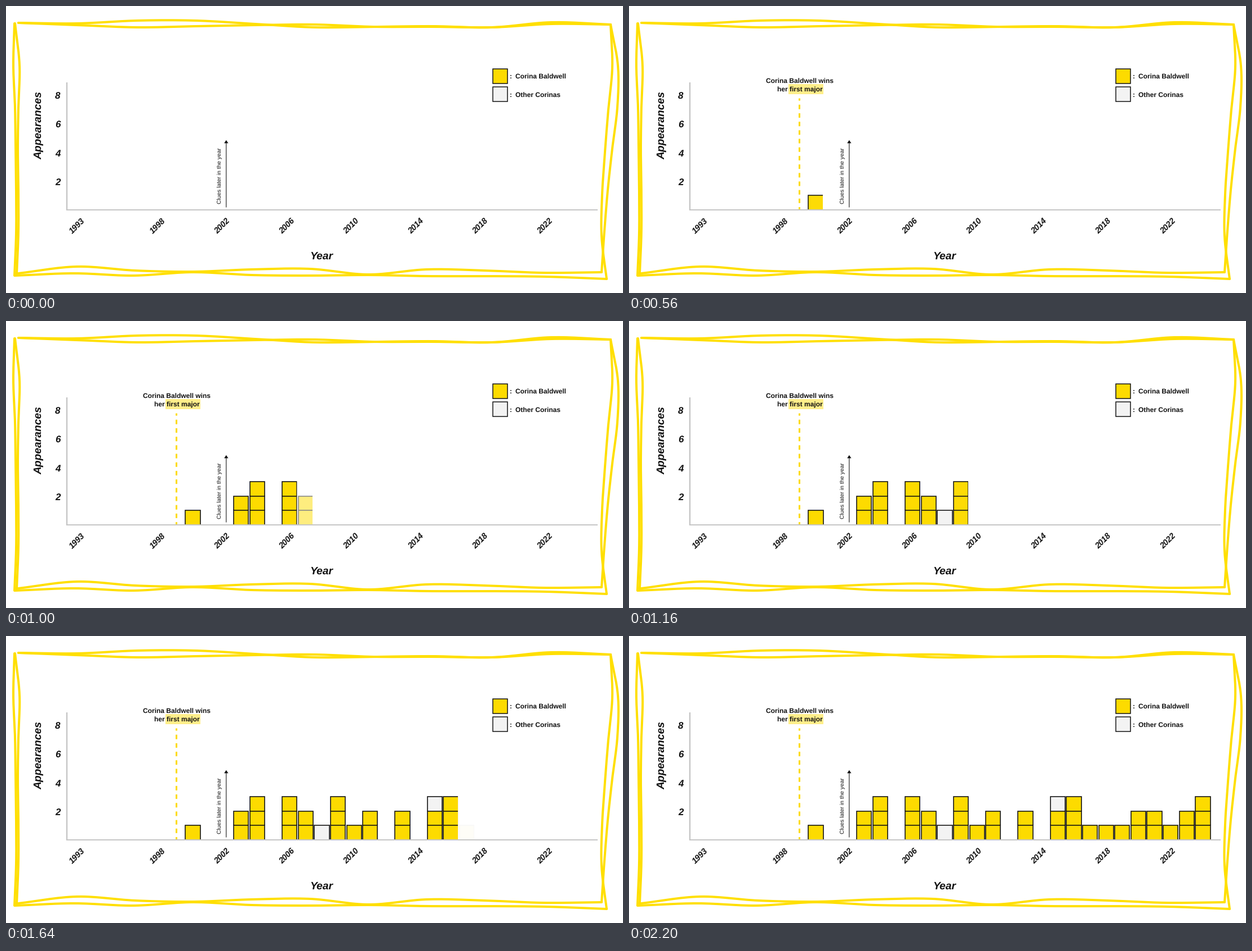
Recreate the animation shown at these times as a matplotlib script. Size 1095 by 511 pixels, loop 2.48 s.

```python
import numpy as np
import matplotlib.pyplot as plt
from matplotlib.animation import FuncAnimation
from matplotlib.patches import Polygon, Rectangle

W, H, DPI = 1095, 511, 100
STEP, FRAMES = 40, 62
PX = 72 / DPI

YELLOW, GREY, INK = "#fddb00", "#f3f3f3", "#111111"
SKETCH, AXIS, MARKER = "#ffdf00", "#c6c6c6", "#ffee8a"

BASE, BLOCK, BAR_W, PITCH = 363.2, 25.7, 26.3, 28.63
YEAR_MS = 200 / 3
FIRST = 2000
COUNTS = "1002303213120203311122123"  # bar heights, one digit per year
LAST = FIRST + len(COUNTS) - 1
GREY_BLOCKS = {(2008, 0), (2015, 2)}

plt.rcParams["font.family"] = "Liberation Sans"
plt.rcParams["text.hinting"] = "none"

fig = plt.figure(figsize=((W + 0.01) / DPI, (H + 0.01) / DPI), dpi=DPI,
                 facecolor="white")
ax = fig.add_axes([0, 0, 1, 1])
ax.set_xlim(0, W)
ax.set_ylim(H, 0)
ax.axis("off")


def line(xs, ys, color, width, z=4, **kw):
    return ax.plot(xs, ys, color=color, lw=width * PX, zorder=z, **kw)[0]


def box(x, y, w, h, color, z=2, **kw):
    return ax.add_patch(Rectangle((x, y), w, h, fc=color, zorder=z, **kw))


def label(x, y, text, size, bold=True, italic=False, ha="center", turn=0):
    return ax.text(x, y, text, fontsize=size * PX, color=INK, ha=ha,
                   va="baseline", rotation=turn, rotation_mode="anchor",
                   weight="bold" if bold else "normal",
                   style="italic" if italic else "normal", zorder=6)


def left_of(year):
    return 318.2 + PITCH * (year - FIRST)


def wavy(start, end, *drift):
    """Smooth curve from start to end through evenly spaced drift values."""
    v = np.array(drift, float)
    knots = np.arange(len(v))
    slope = np.gradient(v)
    s = np.linspace(0, len(v) - 1, 150)
    i = np.minimum(s.astype(int), len(v) - 2)
    u = s - i
    ease = u * u * (3 - 2 * u)
    cross = (v[i] * (1 - ease) + v[i + 1] * ease
             + slope[i] * u * (1 - u) ** 2 - slope[i + 1] * u * u * (1 - u))
    return np.interp(s, knots[[0, -1]], [start, end]), cross


def draw_border():
    across = [
        wavy(22, 1073, 30, 31, 26, 26, 32, 38, 37, 36, 38, 29, 33),
        wavy(22, 1073, 30, 34, 38, 36, 34, 33, 37, 37, 38, 32, 33),
        wavy(16, 1066, 480, 476, 480, 474, 479, 480, 479, 481, 481, 482, 486),
        wavy(22, 1057, 476, 464, 471, 473, 469, 468, 478, 469, 471, 475, 474),
    ]
    down = [
        wavy(31, 480, 15, 13, 16, 17, 18, 18, 15),
        wavy(31, 477, 16, 24, 22, 21, 22, 22, 19),
        wavy(33, 486, 1073, 1076, 1069, 1063, 1058, 1057, 1066),
        wavy(33, 474, 1073, 1086, 1085, 1076, 1068, 1062, 1057),
    ]
    for xs, ys in across + [(x, y) for y, x in down]:
        line(xs, ys, SKETCH, 4, z=7, solid_capstyle="round")


def draw_axes():
    line([108, 108], [136, 364], AXIS, 2.4, z=5, solid_capstyle="butt")
    line([107, 1050], [363.4, 363.4], AXIS, 2, z=5, solid_capstyle="butt")
    for n in range(2, 9, 2):
        label(92, 370.3 - 25.6 * n, str(n), 17, italic=True)
    for year in (1993, 1998, *range(2002, 2023, 4)):
        label(left_of(year) + 11.2, 394.7, str(year), 14.5, italic=True,
              turn=45)
    label(63, 212.5, "Appearances", 19.3, italic=True, turn=90)
    label(560, 450.5, "Year", 19.3, italic=True)


def draw_hint():
    x = 390.8
    label(382, 302, "Clues later in the year", 10.3, bold=False, turn=90)
    line([x, x], [358, 243], INK, 1.1, z=6, snap=False)
    ax.add_patch(Polygon([(x - 3.7, 244.3), (x + 3.7, 244.3), (x, 238.8)],
                         fc=INK, zorder=6))


def draw_legend():
    rows = ((112, YELLOW, "Corina Baldwell"), (144.5, GREY, "Other Corinas"))
    for y, color, text in rows:
        box(863.5, y, 26, 26, color, ec=INK, lw=1.5 * PX)
        label(896, y + 17, ":", 12)
        label(904, y + 17, text, 12, ha="left")


def draw_bars():
    for year, count in enumerate(COUNTS, FIRST):
        x = left_of(year)
        for i in range(int(count)):
            top = BASE - (i + 1) * BLOCK
            color = GREY if (year, i) in GREY_BLOCKS else YELLOW
            box(x, top, BAR_W, BLOCK, color, lw=0)
            line([x, x, x + BAR_W, x + BAR_W],
                 [top + BLOCK, top, top, top + BLOCK], INK, 1.6, z=2.5,
                 solid_capstyle="butt", solid_joinstyle="miter")


def make_covers():
    """White veils, one per year, that fade to reveal the bars."""
    covers = {}
    for year in range(FIRST, LAST + 1):
        w = PITCH if year < LAST else PITCH + 6
        covers[year] = box(left_of(year) - 2.9, 280, w, BASE - 280, "white",
                           z=3, lw=0, antialiased=False)
    return covers


def make_note():
    return [
        label(302.5, 136.5, "Corina Baldwell wins", 12),
        label(303, 152.5, "her first major", 12),
        box(283, 139, 62, 18, MARKER, z=5, lw=0),
        line([302.3, 302.3], [164.5, 362.5], YELLOW, 3, z=4,
             linestyle=(4 / 3, (8 / 3, 7.2 / 3)), dash_capstyle="butt"),
    ]


def shown(year, ms):
    middle = 800 + YEAR_MS * (year - 2004)
    u = float(np.clip((ms - middle) / YEAR_MS + 0.5, 0, 1))
    return u * u * (3 - 2 * u)


draw_border()
draw_axes()
draw_hint()
draw_legend()
draw_bars()
covers = make_covers()
note = make_note()


def update(frame):
    ms = frame * STEP
    for year, cover in covers.items():
        cover.set_alpha(1 - shown(year, ms))
    for part in note:
        part.set_alpha(shown(1999, ms))
    return [*covers.values(), *note]


anim = FuncAnimation(fig, update, frames=FRAMES, interval=STEP, repeat=True,
                     repeat_delay=0, blit=False)
plt.show()
```
